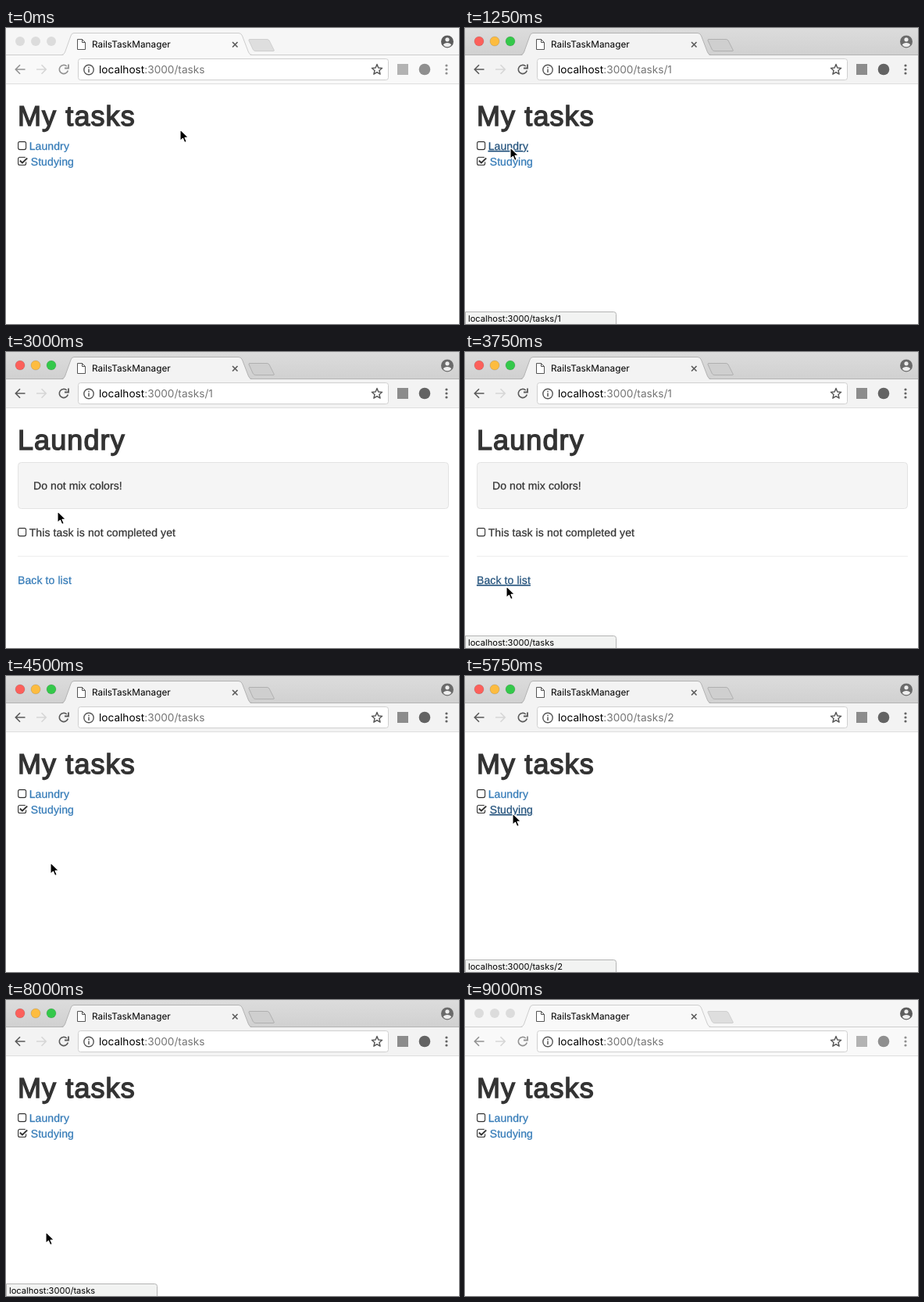
Recreate the animation shown at these times as an HTML page. Size 580 px wide and 379 px high, loop 9.25 s.

```html
<!DOCTYPE html>
<html lang="en">
<head>
<meta charset="utf-8">
<title>Task list</title>
<style>
  html, body { margin: 0; width: 100%; height: 100%; overflow: hidden; background: #fff; }
  svg { display: block; width: 580px; height: 379px; }
  text { text-rendering: geometricPrecision; white-space: pre; }
  .ui { font-family: Inter, Roboto, sans-serif; fill: #000; }
  .page text { font: 14px "Liberation Sans", Arial, sans-serif; letter-spacing: .1px; fill: #333; stroke: #333; stroke-width: .25px; }
  .page .title { font-size: 36px; letter-spacing: 1.1px; stroke-width: 1.4px; }
  .page .link { fill: #337ab7; stroke: #337ab7; }
  .page .link.hover { fill: #23527c; stroke: #23527c; text-decoration: underline 1px; text-underline-offset: 1px; }
  .line { fill: none; stroke-width: 1.6; }
  .strip { fill: url(#strip); }
  .bar { fill: #f3f3f3; }
  .edge { stroke: #b3b3b3; }
  .plus { fill: #cfcfcf; stroke: #b0b0b0; }
  .light { stroke: #000; stroke-opacity: .12; }
  .tool { stroke: #5a5a5a; }
  .ext { fill: #636363; }
  .shield { fill: #8c8c8c; }
  .user { fill: #6a6a6a; }
  .idle .strip { fill: #f6f6f6; }
  .idle .bar { fill: #f9f9f9; }
  .idle .edge { stroke: #cdcdcd; }
  .idle .plus { fill: #dedede; stroke: #cfcfcf; }
  .idle .tool { stroke: #929292; }
  .idle .ext { fill: #8f8f8f; }
  .idle .shield { fill: #b3b3b3; }
  .idle .light { fill: #dcdcdc; stroke: none; }
  .idle .user { fill: #5c5c5c; }
</style>
</head>
<body>
<svg viewBox="0 0 580 379">
  <defs>
    <linearGradient id="strip" x2="0" y2="1">
      <stop stop-color="#dcdcdc"/><stop offset="1" stop-color="#d0d0d0"/>
    </linearGradient>
    <g id="open">
      <rect x=".6" y=".6" width="10" height="10" rx="2" fill="none" stroke="#333" stroke-width="1.1"/>
    </g>
    <g id="done" fill="none" stroke="#333">
      <path d="M10.6 6.5v2a2 2 0 0 1-2 2h-6a2 2 0 0 1-2-2v-6a2 2 0 0 1 2-2h6q.8 0 1.3.4" stroke-width="1.1"/>
      <path d="M2.9 4.7l3 3L12.2 1.6" stroke-width="2"/>
    </g>
  </defs>

  <rect width="580" height="379" fill="#fff"/>

  <g id="chrome" class="idle">
    <rect class="strip" width="580" height="36"/>
    <rect class="bar" y="35" width="580" height="36"/>
    <path class="edge" d="M0 34.5H580" fill="none"/>
    <path class="bar" d="M71 36Q74 35 75.500 31L83 10Q84 6.500 87 6.500H298Q301 6.500 302.500 10L310.500 31Q312 35 315 36Z"/>
    <path class="edge" d="M71 34.500Q74 34.500 75.500 31L83 10Q84 6.500 87 6.500H298Q301 6.500 302.500 10L310.500 31Q312 34.500 315 34.500" fill="none"/>
    <path class="plus" d="M312 14.500H334Q336 14.500 337 16L343 28Q344 29.500 342 29.500H320Q317.500 29.500 316.500 28L311 16Q310.500 14.500 312 14.500Z"/>
    <path d="M0 71.500H580" stroke="#dedede"/>
    <circle class="light" cx="18" cy="17" r="6" fill="#fc605b"/>
    <circle class="light" cx="38" cy="17" r="6" fill="#fdbc40"/>
    <circle class="light" cx="58" cy="17" r="6" fill="#34c84a"/>

    <path d="M91.500 14.500H97.500L101.500 18.500V27.500H91.500ZM97.500 14.500V18.500H101.500" fill="#fff" stroke="#555"/>
    <text class="ui" x="110" y="25" font-size="11.8">RailsTaskManager</text>
    <path class="line" d="M290 18l6.500 6.500M296.500 18l-6.500 6.500" stroke="#5a5a5a"/>

    <g transform="translate(0 .4)">
      <circle class="user" cx="565" cy="17" r="8"/>
      <g fill="#eee"><circle cx="565" cy="14.400" r="2.600"/><path d="M559.800 21.300Q561 18.500 565 18.500T570.200 21.300Q568 23.800 565 23.800T559.800 21.300Z"/></g>
    </g>

    <g class="line tool">
      <path d="M24.500 53H12.500M18 47.300L12.300 53L18 58.700"/>
      <path d="M39 53H51M45.500 47.300L51.200 53L45.500 58.700" stroke="#d6d6d6"/>
      <path d="M79.300 54.500A5.600 5.600 0 1 1 77.800 49"/>
      <path d="M80 46.500V51.500H75" stroke-width="1.800"/>
    </g>

    <rect x="92.500" y="39.500" width="397" height="27" rx="3" fill="#fff" stroke="#cfcfcf"/>
    <circle cx="106" cy="53.500" r="6.200" fill="none" stroke="#555" stroke-width="1.400"/>
    <path d="M106 52.500V57M106 49.800V51.300" stroke="#555" stroke-width="1.500"/>
    <text class="ui" x="119" y="58" font-size="13.65">localhost<tspan id="url" fill="#757575"></tspan></text>
    <path id="star" fill="none" stroke="#555" stroke-width="1.400" stroke-linejoin="round"/>

    <rect class="shield" x="501" y="46" width="14" height="14"/>
    <circle class="ext" cx="536" cy="53" r="7.300"/>
    <g class="ext"><circle cx="564" cy="48" r="1.600"/><circle cx="564" cy="53" r="1.600"/><circle cx="564" cy="58" r="1.600"/></g>
  </g>

  <g id="list" class="page">
    <text class="title" x="15" y="125">My tasks</text>
    <use href="#open" x="15" y="145"/>
    <text class="link" id="first" x="29.700" y="156">Laundry</text>
    <use href="#done" x="15" y="165"/>
    <text class="link" id="second" x="31.700" y="176">Studying</text>
  </g>

  <g id="task" class="page">
    <text class="title" id="name" x="15" y="125"></text>
    <rect x="15.500" y="141.500" width="551" height="59" rx="4" fill="#f5f5f5" stroke="#e3e3e3"/>
    <text id="note" x="35" y="176"></text>
    <use id="mark" x="15" y="225"/>
    <text id="state" y="236"></text>
    <path d="M15 261.500H567" stroke="#eee"/>
    <text class="link" id="back" x="15" y="297">Back to list</text>
  </g>

  <g id="status">
    <path d="M.5 363.500H190.500Q193.500 363.500 193.500 366.500V380H.5Z" fill="#f2f3f2" stroke="#b4b4b4"/>
    <text class="ui" id="hint" x="4" y="376" font-size="11.1"></text>
  </g>

  <path id="arrow" d="M0 0V14.500L3.400 11.300L5.700 16.600L8.300 15.500L6 10.400H10.600Z" fill="#000" stroke="#fff" stroke-width="1.100" stroke-linejoin="round"/>
</svg>
<script>
const LOOP = 9250, STEP = 250;
const $ = id => document.getElementById(id);

const tasks = [null,
  { name: 'Laundry', note: 'Do not mix colors!', mark: '#open', x: 29.7, state: 'This task is not completed yet' },
  { name: 'Studying', note: 'A lot of flashcards to do', mark: '#done', x: 31.7, state: 'This task is completed' }
];

// Each entry changes only the listed values. page 0 is the list.
const steps = [
  [0, { idle: true, page: 0, url: '', hint: '', shade: 0, hover: '', pointer: true }],
  [250, { idle: false }],
  [1000, { hover: 'first', hint: '/1', shade: 1 }],
  [1250, { url: '/1' }],
  [1500, { page: 1, hover: '' }],
  [1750, { shade: .4 }],
  [2000, { shade: 0 }],
  [3500, { hover: 'back', hint: '', shade: 1 }],
  [4000, { page: 0, url: '', hover: '' }],
  [4250, { shade: .4 }],
  [4500, { shade: 0 }],
  [5000, { hover: 'second', hint: '/2', shade: 1 }],
  [5750, { url: '/2' }],
  [6000, { page: 2, hover: '' }],
  [6250, { shade: .4 }],
  [6500, { hover: 'back', hint: '', shade: 1 }],
  [6750, { hover: '', shade: .4 }],
  [7000, { hover: 'back', shade: 1 }],
  [8000, { page: 0, url: '', hover: '' }],
  [8250, { shade: .4 }],
  [8500, { shade: 0 }],
  [9000, { idle: true, pointer: false }]
];

// time, x, y of the pointer tip
const path = [
  [0, 223, 130], [250, 223, 130], [750, 110, 147], [1000, 60, 152], [1500, 55, 153],
  [2000, 67, 153], [2250, 69, 155], [2500, 69, 155], [3000, 66, 204], [3500, 55, 292],
  [3750, 53, 300], [4000, 53, 300], [4500, 57, 239], [5000, 61, 176], [6000, 61, 176],
  [6500, 51, 287], [6750, 48, 303], [7000, 50, 300], [7500, 51, 297], [LOOP, 51, 297]
];

function pointerAt(t) {
  const i = path.findIndex(p => p[0] > t);
  const [a, x, y] = path[i - 1], [b, u, v] = path[i];
  const k = (t - a) / (b - a);
  return [Math.round(x + (u - x) * k), Math.round(y + (v - y) * k)];
}

const show = (id, on) => $(id).style.display = on ? '' : 'none';

function draw(t) {
  const s = Object.assign({}, ...steps.filter(e => e[0] <= t).map(e => e[1]));
  $('chrome').setAttribute('class', s.idle ? 'idle' : '');
  $('url').textContent = ':3000/tasks' + s.url;
  $('hint').textContent = 'localhost:3000/tasks' + s.hint;
  $('status').style.opacity = s.shade;
  show('list', !s.page);
  show('task', s.page);
  show('arrow', s.pointer);
  const task = tasks[s.page];
  if (task) {
    for (const id of ['name', 'note', 'state']) $(id).textContent = task[id];
    $('mark').setAttribute('href', task.mark);
    $('state').setAttribute('x', task.x);
  }
  for (const id of ['first', 'second', 'back']) $(id).classList.toggle('hover', s.hover === id);
  $('arrow').setAttribute('transform', `translate(${pointerAt(t)})`);
}

const corners = Array.from({ length: 10 }, (_, i) => {
  const r = i % 2 ? 3.1 : 7, a = Math.PI * (i / 5 - .5);
  return [475 + r * Math.cos(a), 53.5 + r * Math.sin(a)];
});
$('star').setAttribute('d', 'M' + corners.join('L') + 'Z');

let last = -1;
function tick() {
  const t = Math.floor(performance.now() % LOOP / STEP) * STEP;
  if (t !== last) draw(last = t);
  requestAnimationFrame(tick);
}
tick();
</script>
</body>
</html>
```
